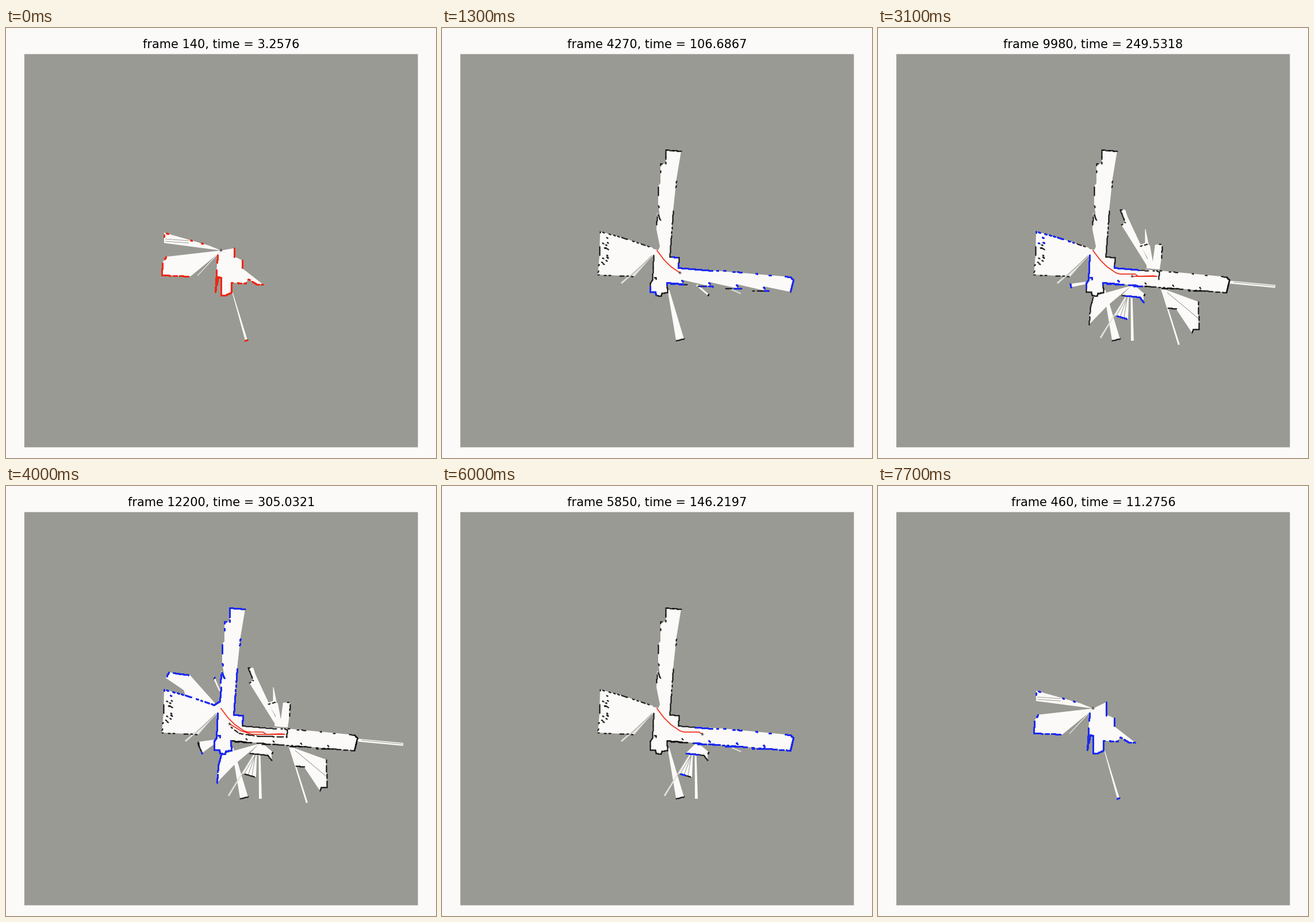
A matplotlib script for the animation above (7.8 s loop, 748 px wide and 748 px high).

```python
import numpy as np
import matplotlib.pyplot as plt
from matplotlib.animation import FuncAnimation
from matplotlib.patches import Polygon, Rectangle
from matplotlib.path import Path

SIZE, DPI, STEPS = 748, 64, 39
PT = 72 / DPI                       # points per pixel
PAPER, GRAY, PALE = "#fcfaf8", "#999a94", "#e2e1dc"
RED, BLUE = "#ee2813", "#1c2af0"
X0, X1, Y0, Y1 = 260, 700, 200, 560  # part of the stage that the map uses

fig = plt.figure(figsize=(SIZE / DPI, SIZE / DPI), dpi=DPI, facecolor=PAPER)
ax = fig.add_axes([0, 0, 1, 1])
ax.set(xlim=(0, SIZE), ylim=(SIZE, 0))
ax.axis("off")
ax.add_patch(Rectangle((31.9, 45.4), 684.6, 684, fc=GRAY, lw=0, snap=False, zorder=0))

rng = np.random.default_rng(4)
cells = np.stack(np.meshgrid(np.arange(X0, X1), np.arange(Y0, Y1)), -1)
rooms, walls = [], []


def wall(first, pts, density=1.0, last=STEPS):
    """Sample a wall every pixel; lower densities break it into dashes."""
    for a, b in zip(np.array(pts, float)[:-1], np.array(pts, float)[1:]):
        n = int(np.hypot(*(b - a))) + 2
        line = a + (b - a) * np.linspace(0, 1, n)[:, None]
        keep = np.repeat(rng.random(n // 4 + 1) < density, 4)[:n]
        walls.append((line[keep], first, last))


def room(first, pts, solid=0, density=1.0, last=STEPS, color=PAPER):
    """Free floor; its first `solid` edges are walls."""
    patch = ax.add_patch(Polygon(pts, fc=color, lw=0, zorder=1))
    inside = Path(pts).contains_points(cells.reshape(-1, 2)).reshape(cells.shape[:2])
    rooms.append((patch, inside, first, last))
    if solid:
        wall(first, pts[:solid + 1], density, last)


def ray(first, start, end, w0, w1, cap=0.0, last=STEPS, color=PAPER):
    """Narrow beam from width w0 to w1, with an optional wall at its end."""
    a, b = np.array(start, float), np.array(end, float)
    side = np.array([a[1] - b[1], b[0] - a[0]]) / np.hypot(*(b - a)) / 2
    pts = [b + side * w1, b - side * w1, a - side * w0, a + side * w0]
    room(first, pts, int(cap > 0), cap, last, color)


# First sweep from the starting point
START = (374, 387)
room(0, [(275, 374), (275, 356), (352, 378), START], 2, 0.35, last=3)
room(0, [(321, 432), (271, 430), (272, 409), (278, 398), START, (366, 395)],
     3, 0.8, last=3)
room(0, [(447, 446), (437, 446), (421, 437), (417, 444), (392, 443), (392, 460),
         (381, 465), (374, 465), (374, 434), (369, 433), (364, 459), (368, 395),
         START, (411, 404), (411, 418)], 11, 0.8, last=3)
wall(0, [(411, 404), (411, 417)], last=3)
room(0, [(397, 398), (397, 383), START], 1, last=0)
room(1, [(397, 399), (397, 376), START], 1, last=3)
ray(0, START, (333, 431), 1, 1, last=3)
ray(0, (393, 457), (418, 543), 1, 4, cap=1, last=5)
for y in (367, 371):
    ray(0, (277, y), (318, y + 3), 1, 1, color=GRAY)

# West room
room(4, [(336, 432), (271, 429), (274, 395), (275, 354), (312, 364), (366, 382),
         (371, 390), (368, 394), (334, 432)], 5, 0.6)
ray(4, (367, 396), (312, 444), 1, 3, color=PALE)
ray(4, (366, 395), (333, 432), 1, 3, color=PALE)
ray(4, (365, 396), (328, 432), 1, 1, color=GRAY)
for x, y in zip(rng.uniform(276, 288, 14), rng.uniform(357, 410, 14)):
    wall(4, [(x, y), (x + 2, y + 1)])

# North corridor
room(4, [(373, 350), (374, 321), (380, 335), (376, 306), (376, 275), (380, 270),
         (380, 236), (389, 236), (389, 212), (416, 214), (408, 262), (402, 318),
         (396, 398), (374, 392), (379, 380)], 9, 0.5)
wall(4, [(389, 212), (416, 214)])
wall(4, [(402, 318), (396, 398)], 0.9)
wall(4, [(408, 262), (402, 318)], 0.2)

# Hall and the south ray
room(4, [(418, 445), (391, 443), (392, 460), (382, 461), (381, 466), (372, 465),
         (371, 459), (362, 459), (362, 444), (366, 438), (368, 395), (366, 384),
         (396, 390), (396, 398), (412, 399), (411, 417)], 10)
wall(4, [(396, 398), (412, 399), (411, 417)])
wall(4, [(369, 434), (372, 434), (372, 437)])
ray(4, (400, 422), (446, 447), 30, 1, last=8)
ray(6, (394, 456), (414, 542), 3, 14, cap=1)


# East corridor: door posts hide parts of its south wall at first
def floor(x):
    return 443 + 0.08 * (x - 391)


POSTS = (560, 513, 465, 418)
teeth = [p for x in POSTS for p in ((x, floor(x) - 7), (x, floor(x)))] + [(391, 443)]
room(9, [(411, 417), (607, 449), (606, 459)] + teeth, last=11)
room(12, [(411, 417), (606, 433), (611, 438), (606, 459)] + teeth, last=16)
room(17, [(606, 433), (611, 438), (606, 460), (391, 443), (411, 417), (490, 422)], 2)
wall(17, [(606, 460), (391, 443)], 0.6)
wall(12, [(606, 433), (611, 438), (606, 459)])
wall(12, [(411, 417), (470, 422)])
wall(12, [(470, 422), (490, 422), (606, 433)], 0.25)
for x in POSTS:
    wall(9, [(x - 20, floor(x)), (x + 8, floor(x + 8))], 0.9)
    wall(9, [(x - 1, floor(x) - 6), (x + 1, floor(x) - 4)])
wall(9, [(606, 459), (607, 452)], last=11)
ray(9, (443, 447), (463, 464), 3, 3, cap=1)
ray(9, (499, 453), (520, 462), 2, 2, last=18, color=PALE)
ray(19, (611, 442), (691, 449.5), 5, 5)
ray(19, (618, 442), (690, 449), 1, 1, color=GRAY)
wall(20, [(484, 422), (489, 424), (488, 437)])

# Views through the doors on the south side
DOOR = (441, 448)
room(18, [(424, 465), (436, 466), (455, 468), (462, 477), (462, 463), DOOR], 3)
ray(18, (441, 462), (442.5, 544), 3, 5, cap=0.5)
ray(18, (434, 466), (423, 503), 5, 25, cap=0.7)
ray(18, (431, 467), (387, 539), 1, 3, color=PALE)
for x in (413, 421, 428):
    ray(18, (434, 467), (x, 503), 1, 1, color=GRAY)
ray(20, DOOR, (370, 508), 2, 14, last=28)
ray(20, DOOR, (374, 471), 2, 4, cap=1, last=28)
room(29, [(367, 516), (369, 487), (374, 468), (395, 461), DOOR, (398, 484)], 2, 0.8)
ray(29, (364, 443), (335, 448), 4, 6, cap=1)
ray(36, (364, 444), (337, 456), 6, 19, cap=0.8)
room(22, [(546, 530), (548, 524), (558, 524), (557, 476), (491, 452), (504, 487),
          (518, 488)], 3, 0.8)
wall(22, [(504, 487), (519, 488)])
ray(22, (503, 460), (557, 505), 1, 1, color=GRAY)
ray(23, (493, 453), (523.5, 551), 2, 3)

# Views to the north side
room(20, [(423, 342), (430, 338), (421, 316), (430, 316), (434, 328), (476, 418),
          (468, 414)], 3, 0.6)
room(20, [(482, 377), (494, 376), (493, 400), (490, 420), (467, 418), (469, 400),
          (456, 377), (464, 374), (473, 378), (478, 406)], 2, 0.6)
wall(20, [(456, 379), (468, 376)], 0.6)
ray(20, (468, 380), (465, 350), 7, 1)

# Seen on the way back, with a trail left by something that moved
room(36, [(278, 334), (283, 324), (320, 329), (362, 376), (372, 388), (312, 364),
          (309, 355)], 2, 0.8)
room(36, [(361, 381), (372, 374), (374, 350), (385, 340), (385, 390), START], 2)
ray(36, (372, 357), (362, 334), 2, 3, cap=1)
wall(35, [(391, 419), (405, 430), (440, 435), (488, 436)], 0.85)

# Step, x, y, heading in degrees (clockwise from east)
ROUTE = np.array([
    (0, 374, 387, 86), (5, 374, 387, 86), (8, 386, 403, 50), (10, 398, 415, 41),
    (13, 414, 426, 20), (14, 421, 428, 12), (17, 447, 428, 5), (18, 453, 432, 0),
    (22, 478, 431, 0), (25, 485, 432, 180), (31, 442, 432, 180), (33, 428, 432, 185),
    (35, 409, 426, 205), (38, 389, 414, 222), (39, 383, 404, 225)])


def place(t):
    return np.array([np.interp(t, ROUTE[:, 0], col) for col in ROUTE.T[1:]])


def seen(pts, free, x, y, heading):
    """Wall points in the 270 degree view with a clear line of sight."""
    d = pts - (x, y)
    dist = np.hypot(*d.T) + 1e-6
    turn = (np.degrees(np.arctan2(d[:, 1], d[:, 0])) - heading + 180) % 360 - 180
    reach = np.clip(1 - 4 / dist, 0, 1)
    t = np.linspace(0, 1, 90)[:, None] * reach
    col = np.clip(np.rint(x + t * d[:, 0]).astype(int) - X0, 0, X1 - X0 - 1)
    row = np.clip(np.rint(y + t * d[:, 1]).astype(int) - Y0, 0, Y1 - Y0 - 1)
    return pts[(abs(turn) < 136) & (free[row, col].mean(0) > 0.97)]


def dots(marker, size, color, z):
    return ax.plot([], [], marker, color=color, ms=size * PT, mew=0, zorder=z)[0]


black = dots("s", 1.7, "#0a0a0a", 3)
hits = dots("o", 3.1, BLUE, 5)
robot = dots("*", 7.5, "#4a4a48", 6)
path, = ax.plot([], [], color="#ee3524", lw=1.8 * PT, zorder=4)
title = ax.text(374.6, 35, "", fontsize=20.83 * PT, family="DejaVu Sans",
                ha="center", va="baseline", color="black")

COUNTS = [140, 460, 3310, 4270, 8070, 9980, 12200, 12520]
CLOCK = [3.2576, 11.2756, 82.6550, 106.6867, 201.7660, 249.5318, 305.0321, 313.0327]


def update(k):
    step = min(k, 2 * STEPS - k)    # plays forward, then back
    free = np.zeros(cells.shape[:2], bool)
    for patch, inside, first, last in rooms:
        on = first <= step <= last
        patch.set_visible(on)
        if on:
            free |= inside
    for shift, axis in ((1, 0), (-1, 0), (1, 1), (-1, 1)):
        free = free | np.roll(free, shift, axis)

    solid = np.vstack([w for w, first, last in walls if first <= step <= last])
    x, y, heading = place(step)
    red = step % 10 == 0
    black.set_data(*solid.T)
    hits.set_data(*seen(solid, free, x, y, heading).T)
    hits.set_color(RED if red else BLUE)
    path.set_data(*place(np.append(np.arange(0, step, 0.1), step))[:2])
    robot.set_data([x], [y])
    robot.set_visible(step == 0 or not red)

    count = 10 * round((140 + 317.35 * step) / 10)
    title.set_text(f"frame {count}, time = {np.interp(count, COUNTS, CLOCK):.4f}")
    return []


anim = FuncAnimation(fig, update, frames=2 * STEPS, interval=100, repeat=True)
plt.show()
```
